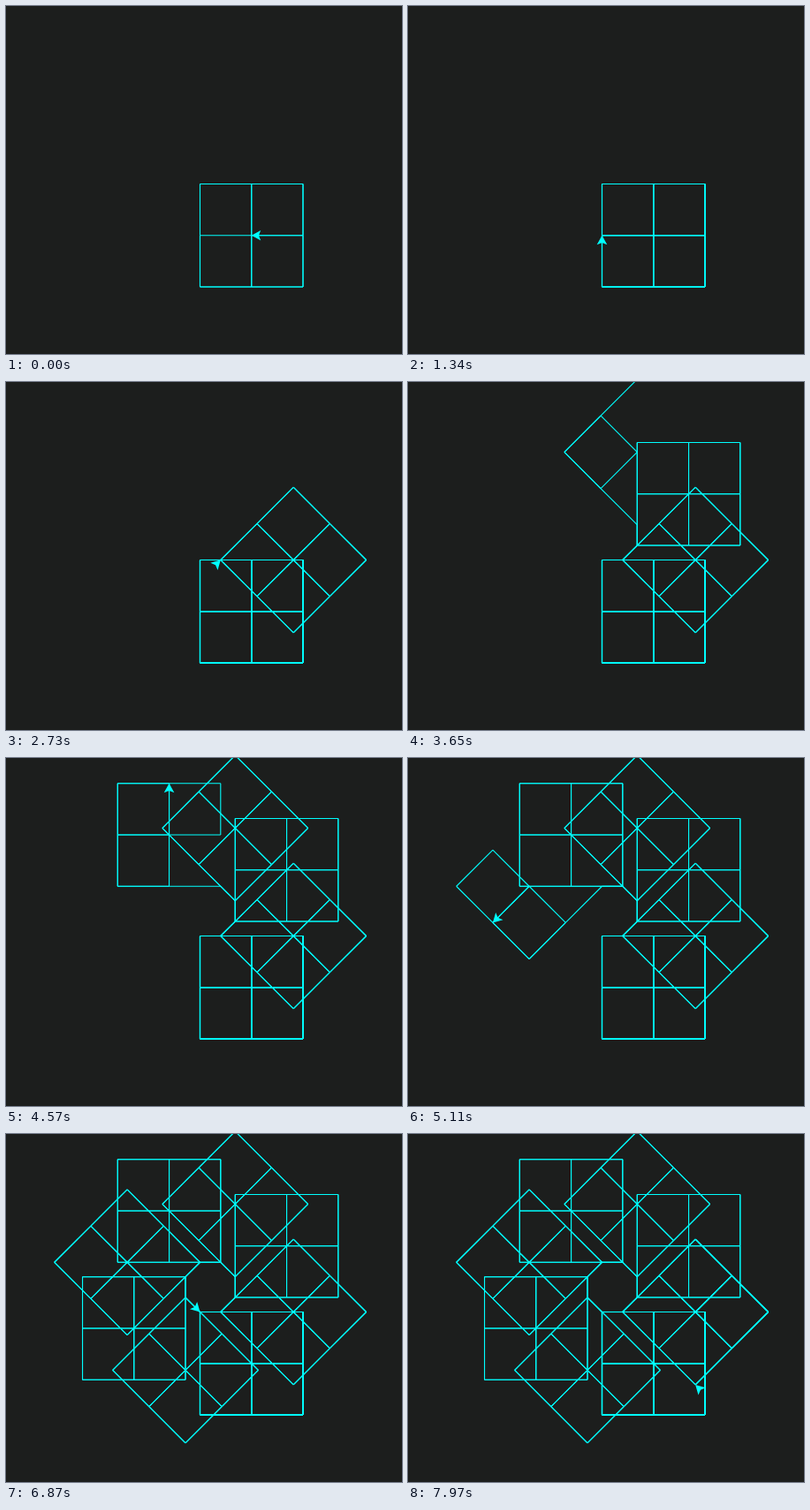
An HTML page with a canvas that plays this animation: 448 px wide and 394 px high, repeating every 8 s.

```html
<!DOCTYPE html>
<html lang="en">
<head>
<meta charset="utf-8">
<title>Turtle squares</title>
<style>
  html, body { margin: 0; width: 100%; height: 100%; overflow: hidden; background: #1c1e1d; }
  canvas { display: block; }
</style>
</head>
<body>
<canvas id="stage" width="448" height="394"></canvas>
<script>
const ctx = document.getElementById('stage').getContext('2d');
const LOOP = 8000, HOLD = 719, TICK = 76.85;
const FIRST_COMMAND = 39.9, COMMANDS_PER_TICK = 5.13;
const SCALE = 1.165, SIDE = 50, GAP = 20;
const BACKGROUND = '#1c1e1d', INK = '#00ffff';

// The turtle program: a list of moves (fd) and right turns in degrees (rt).
const program = [];
const forward = fd => program.push({ fd, rt: 0 });
const right = rt => program.push({ fd: 0, rt });

function square() {
  for (let i = 0; i < 4; i++) {
    forward(SIDE);
    right(90);
  }
}

function windowShape() {
  for (let i = 0; i < 4; i++) {
    forward(SIDE);
    square();
    forward(SIDE);
    right(90);
  }
}

windowShape();
windowShape();
for (let i = 0; i < 10; i++) {
  windowShape();
  forward(GAP);
  right(-45);
}

function drawTurtle(x, y, heading) {
  ctx.save();
  ctx.translate(x, y);
  ctx.rotate(heading);
  ctx.scale(SCALE, SCALE);
  ctx.beginPath();
  ctx.moveTo(0, 0);
  ctx.lineTo(-9, -5);
  ctx.lineTo(-7, 0);
  ctx.lineTo(-9, 5);
  ctx.closePath();
  ctx.fill();
  ctx.restore();
}

function draw(count) {
  let x = 219.5, y = 201.5, degrees = 0;
  ctx.fillStyle = BACKGROUND;
  ctx.fillRect(0, 0, 448, 394);
  ctx.fillStyle = ctx.strokeStyle = INK;
  ctx.lineWidth = 1.1;
  for (const { fd, rt } of program.slice(0, count)) {
    const angle = degrees * Math.PI / 180;
    if (fd) {
      // Separate strokes let retraced lines grow brighter.
      ctx.beginPath();
      ctx.moveTo(x, y);
      x += fd * SCALE * Math.cos(angle);
      y += fd * SCALE * Math.sin(angle);
      ctx.lineTo(x, y);
      ctx.stroke();
    }
    degrees += rt;
  }
  drawTurtle(x, y, degrees * Math.PI / 180);
}

const start = performance.now();
let shown = -1;

function frame() {
  const t = (performance.now() - start) % LOOP;
  const tick = Math.min(95, Math.max(0, Math.floor((t - HOLD) / TICK) + 1));
  const count = Math.round(FIRST_COMMAND + COMMANDS_PER_TICK * tick);
  if (count !== shown) draw(shown = count);
  requestAnimationFrame(frame);
}
frame();
</script>
</body>
</html>
```
